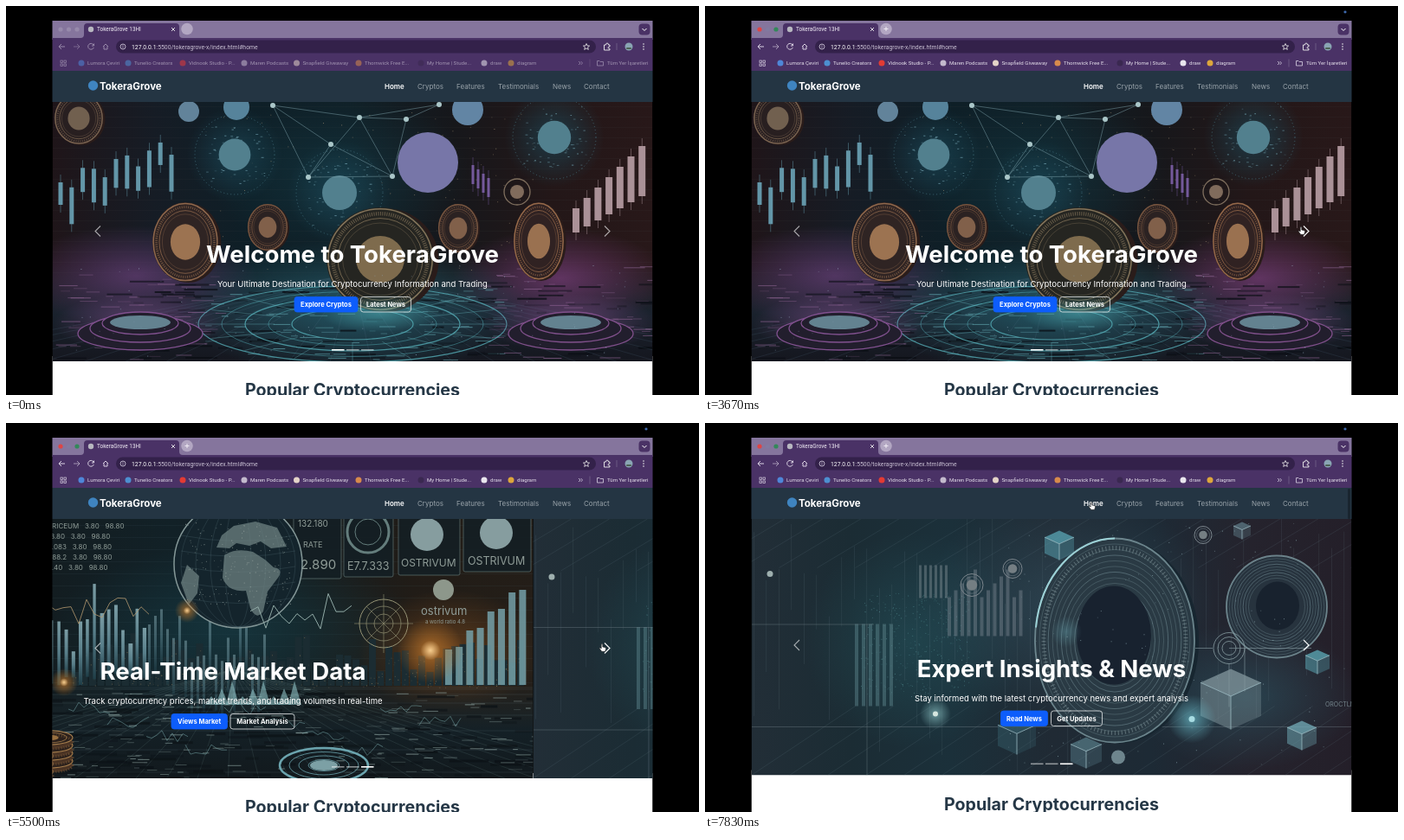
An HTML page that plays this animation: 800 px wide and 450 px high, repeating every 8000 ms.

```html
<!DOCTYPE html>
<html lang="en">
<head>
<meta charset="utf-8">
<title>TokeraGrove</title>
<style>
  html, body { margin: 0; width: 100%; height: 100%; overflow: hidden; background: #000; }
  svg { display: block; width: 100vw; height: 100vh; }
  text { font-family: Inter, "Open Sans", sans-serif; white-space: pre; }
  .ui text { font-family: Roboto, Inter, sans-serif; }
</style>
</head>
<body>
<svg id="stage" viewBox="0 0 800 450"></svg>
<script>
const LEFT = 53.5, WIDTH = 693, LOOP = 8000, TICK = 1000 / 6;

let seed = 7;
const rand = (a = 0, b = 1) => {
  seed = (seed * 16807) % 2147483647;
  return a + (b - a) * seed / 2147483647;
};
const repeat = (n, fn) => Array.from({ length: n }, (_, i) => fn(i)).join('');

// ---- Shape helpers -------------------------------------------------------
let defs = '';
const rect = (x, y, w, h, fill, more = '') =>
  `<rect x="${x}" y="${y}" width="${w}" height="${h}" fill="${fill}" ${more}/>`;
const oval = (x, y, rx, ry, fill, more = '') =>
  `<ellipse cx="${x}" cy="${y}" rx="${rx}" ry="${ry}" fill="${fill}" ${more}/>`;
const dot = (x, y, r, fill, more) => oval(x, y, r, r, fill, more);
const ring = (x, y, rx, ry, color, w = 1, more = '') =>
  oval(x, y, rx, ry, 'none', `stroke="${color}" stroke-width="${w}" ${more}`);
const line = (d, color, w = 1, more = '') =>
  `<path d="${d}" fill="none" stroke="${color}" stroke-width="${w}" ${more}/>`;
const shape = (d, fill, more = '') => `<path d="${d}" fill="${fill}" ${more}/>`;
const text = (x, y, s, size, fill = '#fff', more = '') =>
  `<text x="${x}" y="${y}" font-size="${size}" fill="${fill}" ${more}>${s}</text>`;
const group = (id, kids, more = '') => `<g id="${id}" ${more}>${kids}</g>`;
const BOLD = 'font-weight="700"', MID = 'text-anchor="middle"';

function glow(x, y, rx, ry, color, opacity) {
  const id = 'glow' + color.slice(1);
  if (!defs.includes(`"${id}"`)) {
    defs += `<radialGradient id="${id}"><stop stop-color="${color}"/>
      <stop offset="1" stop-color="${color}" stop-opacity="0"/></radialGradient>`;
  }
  return oval(x, y, rx, ry, `url(#${id})`, `opacity="${opacity}"`);
}
function gradient(id, colors, vertical) {
  const stops = colors.map((c, i) => `<stop offset="${i / (colors.length - 1)}" stop-color="${c}"/>`);
  defs += `<linearGradient id="${id}" ${vertical ? 'x2="0" y2="1"' : ''}>${stops.join('')}</linearGradient>`;
  return `url(#${id})`;
}
// Seeded flecks of a given size range inside a box.
const flecks = (n, x, y, w, h, color, wide = 1, tall = 1) => repeat(n, () =>
  rect(rand(x, x + w).toFixed(1), rand(y, y + h).toFixed(1), rand(wide / 4 + .75, wide).toFixed(1), tall, color,
    `opacity="${rand(.2, .75).toFixed(2)}"`));

function coin(x, y, rx, ry, rim, face, mark) {
  const at = (k, color, w, more) => ring(x, y, rx * k, ry * k, color, w, more);
  return oval(x + rx * .09, y + 1, rx, ry, '#2a1c1a') + oval(x, y, rx, ry, face) +
    at(.97, rim, 1.5) + at(.88, rim, rx * .07, 'stroke-dasharray="1 1.5" opacity=".7"') +
    at(.79, rim, .8) + at(.7, rim, .6, 'opacity=".6"') + oval(x, y, rx * .45, ry * .45, mark);
}
const stack = (x, y, rx, n) => repeat(n, i => {
  const cy = y + (n - 1 - i) * 9;
  return oval(x, cy + 5, rx, rx * .3, '#4b3424') + oval(x, cy, rx, rx * .3, '#2c211c') +
    ring(x, cy, rx, rx * .3, '#a57d4c', 1.2) +
    ring(x, cy + 5, rx, rx * .3, '#7d5b38', 3, 'stroke-dasharray="1 2" opacity=".6"');
}) + ring(x, y, rx * .75, rx * .22, '#a57d4c', .8) + oval(x, y, rx * .4, rx * .12, '#98703f');

const cube = (x, y, r, color) =>
  shape(`M${x} ${y - r}l${r} ${r * .45} ${-r} ${r * .45} ${-r} ${-r * .45}z`, color, 'opacity=".75"') +
  shape(`M${x - r} ${y - r * .55}l${r} ${r * .45}v${r * 1.1}l${-r} ${-r * .45}z`, color, 'opacity=".5"') +
  shape(`M${x + r} ${y - r * .55}l${-r} ${r * .45}v${r * 1.1}l${r} ${-r * .45}z`, color, 'opacity=".33"') +
  line(`M${x - r} ${y - r * .55}l${r} ${r * .45} ${r} ${-r * .45}M${x} ${y - r * .1}v${r * 1.1}`, '#a8c7cf', .7);

const candles = (x, n, step, w, color, top, height) => repeat(n, i => {
  const cx = x + i * step, y = top(i), h = height(i);
  return rect(cx - .4, y - 9, .8, h + 18, color, 'opacity=".6"') + rect(cx - w / 2, y, w, h, color);
});

// ---- Slide pictures ------------------------------------------------------
function coinsScene() {
  const nodes = [[308, 115], [349, 198], [408, 129], [446, 197], [462, 131], [375, 160], [500, 114]];
  const links = [[0, 1], [1, 2], [2, 3], [0, 2], [2, 4], [4, 3], [1, 5], [5, 3], [0, 5], [4, 6], [2, 6], [1, 3]];
  const ghost = (x, y, r) => glow(x, y, r * 1.2, r * 1.2, '#1b4656', .75) +
    ring(x, y, r, r, '#4b7d8b', 1, 'stroke-dasharray="1 3" opacity=".7"') +
    flecks(70, x - r * .75, y - r * .75, r * 1.5, r * 1.5, '#6f9fad', 3) + dot(x, y, r * .4, '#52808e');
  const pad = (x, y, color) => glow(x, y, 100, 34, color, .6) + repeat(3, i =>
    oval(x, y + 12 - i * 6, 72 - i * 14, 19 - i * 3, '#221e2d', `stroke="${color}" stroke-width="1.3"`)) +
    oval(x, y - 1, 35, 8, '#86b8c5', 'opacity=".65"');
  return rect(LEFT, 111, WIDTH, 300,
      gradient('night', ['#1f1519', '#161c25', '#0e1f27', '#101f26', '#16171b', '#231718', '#281819'])) +
    repeat(17, i => rect(LEFT, 116 + i * 12, WIDTH, .4, '#4d4a50', 'opacity=".25"')) +
    rect(LEFT, 298, WIDTH, 113, gradient('floor', ['#20283100', '#1a222d', '#15171f'], true)) +
    glow(150, 312, 140, 58, '#69407a', .7) + glow(640, 315, 125, 58, '#743c76', .75) +
    glow(400, 350, 200, 80, '#266b7a', .7) + glow(385, 195, 150, 95, '#14424f', .45) +
    flecks(110, 230, 120, 380, 190, '#a08d70') +
    flecks(60, 55, 305, 190, 105, '#8e6592', 26) + flecks(60, 550, 300, 196, 110, '#8e6592', 26) +
    flecks(80, 230, 325, 340, 85, '#5fa3ad', 24) + flecks(110, 55, 310, 690, 100, '#090d13', 40, 2) +
    repeat(24, i => line(`M400 310L${LEFT - 300 + i * 56} 430`, '#59738a', .5, 'opacity=".35"')) +
    ghost(264, 172, 46) + ghost(385, 216, 50) + ghost(633, 152, 48) +
    links.map(([a, b]) => line(`M${nodes[a]}L${nodes[b]}`, '#84aab3', .7, 'opacity=".65"')).join('') +
    nodes.map(([x, y]) => dot(x, y, 3, '#aac6c8')).join('') +
    candles(63, 11, 12.8, 5, '#6396a8', i => 204 - i * 4.2 + 11 * Math.sin(i * 2), i => 26 + 17 * Math.sin(i * 1.4) ** 2) +
    candles(658, 7, 12.7, 8, '#aa9197', i => 234 - i * 12, i => 28 + 5 * i) +
    candles(539, 4, 6, 3, '#74599b', i => 184 + i * 5, () => 22) +
    repeat(5, i => ring(400, 368, 70 + i * 27, 18 + i * 6.5, '#58b5be', i % 2 ? .6 : 1.2, 'opacity=".75"')) +
    repeat(16, i => {
      const a = i * Math.PI / 8, c = Math.cos(a), s = Math.sin(a);
      return line(`M${400 + 90 * c} ${368 + 22 * s}L${400 + 176 * c} ${368 + 43 * s}`, '#68b7bf', .6, 'opacity=".6"');
    }) +
    pad(155, 367, '#81518f') + pad(652, 367, '#80508b') +
    coin(84, 130, 28, 30, '#79624f', '#281f20', '#71604f') +
    coin(302, 256, 23, 27, '#77553f', '#2b2222', '#81604a') +
    coin(522, 257, 23, 28, '#77553f', '#2b2222', '#81604a') +
    coin(207, 273, 38, 46, '#8f684c', '#2f2423', '#9c7351') +
    coin(615, 272, 29, 45, '#966949', '#302222', '#9a7150') +
    ring(590, 215, 15, 15, '#80705f', 1.3) + dot(590, 215, 8, '#806b5c') +
    coin(432, 293, 62, 60, '#84745a', '#252521', '#7e6b4d') +
    glow(432, 355, 70, 22, '#55b8be', .5) +
    dot(487, 181, 35, '#7776a8') + dot(266, 117, 15, '#56839b') +
    dot(533, 120, 18, '#6285a4') + dot(211, 122, 12, '#62839a') +
    flecks(90, 70, 300, 660, 105, '#9ab1c7');
}

function marketScene() {
  const frame = (x, y, w, h) => rect(x, y, w, h, '#141f24', 'stroke="#5f7270" stroke-width=".8" rx="2" opacity=".9"');
  const label = (x, y, s, size) => text(x, y, s, size, '#8f9c97');
  const zigzag = (x, y, n, step, amp) => 'M' + repeat(n, i => `${x + i * step} ${(y + rand(-amp, amp)).toFixed(1)} `);
  const flare = (x, y, r) => glow(x, y, r, r, '#c47a2c', .75) + glow(x, y, r * .3, r * .3, '#ffd89a', .9);
  const bar = gradient('bar', ['#86aab2', '#5f8894', '#20404a'], true);
  return rect(LEFT, 111, WIDTH, 300,
      gradient('room', ['#171b1e', '#131d21', '#122127', '#141d20', '#211c17', '#241e18'])) +
    repeat(14, i => rect(LEFT, 118 + i * 14, WIDTH, .4, '#4b6467', 'opacity=".3"')) +
    glow(400, 240, 210, 100, '#17414b', .6) + glow(650, 265, 105, 72, '#70441d', .75) +
    rect(LEFT, 300, WIDTH, 111, gradient('table', ['#1e2b3000', '#142026', '#12191d'], true)) +
    repeat(55, i => {
      const h = rand(15, 62), x = 215 + i * 9.5;
      return rect(x, 304 - h, 8, h, '#1b2c32') + flecks(5, x, 306 - h, 8, h, '#8c7a58');
    }) +
    repeat(30, i => {
      const h = 32 + 55 * Math.abs(Math.sin(i * .34)) + rand(-12, 42), w = rand(3, 5);
      return rect(58 + i * 8.2, 304 - h - rand(0, 18), w, h, bar, 'opacity=".9"');
    }) +
    repeat(20, i => rect(302 + i * 7, 304 - 25 - rand(0, 65), 3, 65, bar, 'opacity=".5"')) +
    frame(78, 104, 100, 60) + coin(138, 120, 37, 36, '#a17d54', '#2b2824', '#92704c') +
    label(79, 177, 'DALCOIN', 18.5) + label(79, 192, 'OSTRIVUM', 16) +
    repeat(5, i => label(186, 122 + i * 12, ['PRICEUM', '13.80', '2.083', '1.88.2', '9.40'][i] +
      '   3.80   98.80', 8)) +
    frame(470, 104, 55, 76) + label(475, 120, '132.180', 10) + label(481, 144, 'RATE', 9) + label(478, 169, '2.890', 15) +
    frame(528, 107, 57, 71) + ring(556, 126, 24, 24, '#647d7c', 3) + ring(556, 126, 15, 15, '#647d7c', 1) +
    label(532, 170, 'E7.7.333', 12.5) +
    frame(591, 102, 71, 74) + frame(666, 102, 78, 70) +
    dot(624, 129, 19, '#869d9f') + dot(704, 127, 19, '#869d9f') +
    label(594, 166, 'OSTRIVUM', 12) + label(671, 164, 'OSTRIVUM', 12.5) +
    dot(406, 163, 74, '#14242c', 'stroke="#849797" stroke-width="1.5"') +
    repeat(4, i => ring(406, 163, 15 + i * 17, 73, '#58747c', .5, 'opacity=".5"')) +
    repeat(5, i => line(`M340 ${130 + i * 18}Q406 ${143 + i * 18} 472 ${130 + i * 18}`, '#58747c', .5, 'opacity=".5"')) +
    shape('M390 153q13-9 33-4l14 9 10 9q12 2 5 12l-12 16-5 23q-8 11-15-4l-5-20q-21 2-27-15zM381 144l6-14 14-11 25-5 25 7 11 22-18 2-12-8-13 5-15-3-8 6zM347 164l14 13-2 20-10 13-9-25z', '#6d8081', 'opacity=".75"') +
    flecks(170, 345, 115, 122, 95, '#a6b2ac') +
    line(zigzag(60, 220, 28, 9, 18), '#b59a70', .8) + line(zigzag(420, 222, 14, 9, 25), '#91aaa6', 1) +
    ring(574, 232, 28, 28, '#949274', 1) + ring(574, 232, 20, 20, '#949274', .7) + ring(574, 232, 11, 11, '#949274', .7) +
    line('M540 232h68M574 198v68M554 212l40 40M594 212l-40 40', '#949274', .6) +
    dot(643, 193, 12, '#8d978b') + label(617, 222, 'ostrivum', 13) + label(622, 232, 'a world ratio 4.8', 6) +
    repeat(8, i => rect(645 + i * 12.2, 262 - i * 11 + (i % 2) * 8, 8, 41 + i * 11 - (i % 2) * 8, '#75a0a8', 'opacity=".85"')) +
    repeat(28, i => line(`M400 285L${-100 + i * 38} 420`, '#5a7377', .5, 'opacity=".45"')) +
    repeat(8, i => line(`M54 ${306 + i * i * 2}H746`, '#5a7377', .5, 'opacity=".4"')) +
    flecks(150, 55, 306, 690, 104, '#0b1115', 46, 3) + flecks(170, 200, 306, 545, 104, '#8fa5a2', 18) +
    repeat(10, i => line(zigzag(210 + i * 45, 330 + i % 4 * 16, 9, 6, 7), '#7fb1b4', .8, 'opacity=".6"')) +
    repeat(9, i => shape(`M${368 + i * 12} 326l7 ${-10 - i % 3 * 9} 8 ${10 + i % 3 * 9}z`, '#8fc1c5', 'opacity=".6"')) +
    repeat(4, i => ring(505, 396, 51 - i * 11, 20 - i * 4.5, '#6ba4ae', i ? .8 : 2.5)) + oval(505, 396, 16, 6, '#7ca0a5') +
    flare(347, 217, 14) + flare(628, 263, 38) + flare(101, 315, 23) + flare(155, 288, 17) + flare(205, 300, 16) +
    stack(188, 364, 27, 4) + stack(150, 385, 42, 3) + stack(78, 372, 23, 4) + stack(77, 403, 30, 2);
}

function insightScene() {
  const rings = (x, y, rx, ry, n) => repeat(n, i => ring(x, y, rx * (1 - i * .055), ry * (1 - i * .055),
    '#78939b', i ? .6 : 1.8, `opacity="${i % 3 ? .55 : .85}"`));
  const mini = (x, y, r) => ring(x, y, r, r, '#7b858c', 1) + ring(x, y, r * .75, r * .75, '#6c7a82', .6) + dot(x, y, r * .48, '#747e83');
  return rect(LEFT, 111, WIDTH, 300,
      gradient('steel', ['#222e37', '#1b2c34', '#1b303a', '#202a34', '#1d2a35', '#25232d', '#241f29'])) +
    glow(240, 255, 125, 125, '#24515a', .6) + glow(420, 215, 170, 130, '#375766', .55) +
    glow(625, 320, 130, 85, '#2b5260', .65) +
    repeat(48, i => rect(56 + i * 14.5, rand(105, 230), .6, rand(60, 220), '#6d848b', 'opacity=".25"')) +
    repeat(22, i => {
      const x = LEFT + i * 44;
      return line(`M${x} 111l-100 60M${x} 411l120 -80`, '#637c85', .5, 'opacity=".35"');
    }) +
    flecks(380, 180, 200, 125, 120, '#4f868c') +
    repeat(6, i => rect(173 + i * 8, 236, 4, 95, '#547a82', 'opacity=".55"')) +
    repeat(12, i => rect(280 + i * 7.5, 205 - i % 5 * 8, 4, 45 + i % 5 * 8, '#869099', 'opacity=".4"')) +
    repeat(6, i => rect(247 + i * 6, 168, 3, 38, '#8c989d', 'opacity=".4"')) +
    line('M54 236.5H195M187 236V411M54 355H746', '#78888f', .6, 'opacity=".6"') +
    dot(75, 178, 3.5, '#9eafae') + mini(308, 191, 13) + mini(355, 172, 11) + mini(575, 133, 10) +
    cube(409, 145, 17, '#5aa6b5') + cube(620, 128, 10, '#5c7884') +
    oval(478, 256, 92, 118, '#172630') + oval(473, 255, 92, 118, '#2a3a44') + rings(473, 255, 92, 118, 11) +
    ring(473, 255, 82, 107, '#90a4a8', 5, 'stroke-dasharray="1 3" opacity=".5"') +
    oval(472, 249, 43, 57, '#18222f') +
    line('M382 240A92 118 0 0 1 473 137', '#9bd0d5', 2) +
    dot(660, 216, 58, '#27333e') + rings(660, 216, 58, 59, 9) + oval(661, 215, 25, 28, '#18222e') +
    repeat(3, i => ring(605, 264, 18 - i * 5, 18 - i * 5, '#899da3', .8)) +
    line('M605 264H700M623 264v50M586 264h-20M605 282v50', '#899da3', .6) +
    cube(607, 323, 35, '#83979e') + cube(689, 365, 17, '#73adb9') + cube(707, 280, 14, '#5dabb9') +
    cube(440, 385, 18, '#557985') + cube(360, 365, 22, '#345c68') +
    dot(477, 390, 8, '#6e858d') +
    glow(562, 346, 28, 28, '#69b9c7', .7) + glow(266, 340, 18, 18, '#88bec0', .7) + glow(417, 245, 18, 18, '#66a4b0', .4) +
    dot(266, 340, 3, '#d6e6df') + dot(562, 346, 3.5, '#a7dce2') +
    text(716, 331, 'OROCTLN', 7, '#75858c') + flecks(150, 350, 115, 390, 285, '#91adb5');
}

// ---- Carousel ------------------------------------------------------------
const button = (x, w, s, fill, edge) =>
  rect(x, 336.5, w, 17.5, fill, `rx="3" stroke="${edge}" stroke-width=".8"`) +
  text(x + w / 2, 348, s, 7.5, '#fff', `${BOLD} ${MID}`);
const slide = (i, scene, title, note, first, second) => group('slide' + i, scene() +
  text(400, 297, title, 27.6, '#fff', `${BOLD} ${MID}`) + text(400, 325, note, 9.5, '#fff', MID) +
  button(...first, '#0d5dfb', '#0d5dfb') + button(...second, 'none', '#e5e8e9'), 'clip-path="url(#hero)"');
const carousel =
  slide(0, coinsScene, 'Welcome to TokeraGrove',
    'Your Ultimate Destination for Cryptocurrency Information and Trading',
    [333, 73, 'Explore Cryptos'], [409.5, 58, 'Latest News']) +
  slide(1, marketScene, 'Real-Time Market Data',
    'Track cryptocurrency prices, market trends, and trading volumes in real-time',
    [329, 64.5, 'Views Market'], [397, 74, 'Market Analysis']) +
  slide(2, insightScene, 'Expert Insights &amp; News',
    'Stay informed with the latest cryptocurrency news and expert analysis',
    [341.5, 54, 'Read News'], [399.5, 59, 'Get Updates']);

const page = group('page', rect(LEFT, 405, WIDTH, 60, '#fff') + carousel +
  line('M109 254.5l-6 6 6 6', '#fff', 1.1, 'opacity=".6"') +
  line('M691 254.5l6 6-6 6', '#fff', 1.2, 'id="next"') +
  repeat(3, i => rect(376 + i * 17, 397, 14.5, 1.6, '#fff', `id="bar${i}"`)) +
  text(400, 451, 'Popular Cryptocurrencies', 19.7, '#253746', `${BOLD} ${MID}`));

// ---- Browser window ------------------------------------------------------
const links = [[475, 'Cryptos'], [520, 'Features'], [568, 'Testimonials'], [631, 'News'], [667, 'Contact']];
const navbar = rect(LEFT, 75, WIDTH, 36, '#243543') + dot(100.5, 92, 5.7, '#3f84c0') +
  text(108, 96.5, 'TokeraGrove', 11.5, '#fff', BOLD) +
  text(437, 95.5, 'Home', 8, '#fff', 'font-weight="600"') +
  links.map(([x, s]) => text(x, 95.5, s, 8, '#98a2a9')).join('');

const marks = [
  [87, '#4f86d8', 'Lumora Çeviri'], [141, '#4d8fd0', 'Tunelio Creators'], [204, '#e33b34', 'Vidnook Studio - P...'],
  [275, '#c3bacd', 'Maren Podcasts'], [335.5, '#e4d3c8', 'Snapfield Giveaway'], [407, '#d78a4c', 'Thornwick Free E...'],
  [479, '#3a2850', 'My Home | Stude...'], [552, '#e9e6ee', 'draw'], [583, '#dda63c', 'diagram']];
const PALE = '#d9d1e2';
const dimmable = group('dimmable',
  line('M68 47h-7m3-3l-3 3 3 3', PALE) + line('M78 47h7m-3-3l3 3-3 3', PALE, 1, 'opacity=".6"') +
  line('M101 45a3.4 3.4 0 1 0 .3 3M101.5 43.5v2.5h-2.5', PALE) + line('M112 47l3-3 3 3M113 46.5v3.5h4v-3.5', PALE) +
  repeat(4, i => rect(63 + i % 2 * 4, 63 + (i >> 1) * 4, 2.5, 2.5, 'none', `stroke="${PALE}" stroke-width=".7"`)) +
  marks.map(([x, c, s]) => dot(x, 66, 3.5, c) + text(x + 7, 68.2, s, 6.1, '#e6e0ec')).join('') +
  line('M661 64l2 2-2 2m2.5-4l2 2-2 2', PALE, .8) + line('M674 61.5v9', '#75638c', .8) +
  line('M682.5 63.5h2.5l1 1h3.5v4.5h-7z', PALE, .8) + text(694, 68.2, 'Tüm Yer İşaretleri', 6.1, '#e6e0ec'));

const browser = group('browser',
  rect(LEFT, 17, WIDTH, 22, '#85759d') + rect(LEFT, 37, WIDTH, 38, '#4a3266') +
  shape('M86 37q4 0 4-4v-9q0-4 4-4h102q4 0 4 4v9q0 4 4 4z', '#4a3266') +
  repeat(3, i => dot(63 + i * 9.5, 27, 2.6, '#978aab', `id="light${i}"`)) +
  dot(98, 27, 3.2, '#b7b7c0') + text(105, 29.3, 'TokeraGrove 13HI', 6.4, '#f3eff7') +
  line('M191 25l4 4m0-4l-4 4', '#eee', .9) + dot(209, 26.5, 6.8, '#b2a6c2') +
  line('M206.5 26.5h5m-2.5-2.5v5', '#f4f0f8', .9, 'id="plus"') +
  rect(730.5, 20.5, 13, 13, '#4a3266', 'rx="4"') + line('M734.5 26l2.5 2.5 2.5-2.5', '#fff') +
  rect(127, 39.5, 554, 15, '#33214a', 'rx="7.5"') +
  ring(135, 47, 3, 3, PALE, .8) + line('M135 46.5v2M135 45v.8', PALE, .8) +
  text(145, 49.5, '<tspan fill="#fff">127.0.0.1</tspan>:5500/tokeragrove-x/index.html#home', 6.85, '#c9c0d3') +
  line('M670 43.5l1 2.4 2.6.2-2 1.7.7 2.6-2.3-1.4-2.3 1.4.7-2.6-2-1.7 2.6-.2z', '#eee', .8) +
  line('M690.5 45h2q0-2 1.5-2t1.5 2h1.5v2q-2 0-2 1.2t2 1.3v1.5h-6.5z', '#eee', .9) +
  line('M705 43v8', '#75638c', .8) + dot(719, 47, 4.5, '#8aa5b4') + rect(716, 48, 6, 2, '#4c6255', 'rx="1"') +
  repeat(3, i => dot(736, 44 + i * 3, .8, '#eee')) + dimmable, 'class="ui"');

const arrow = shape('M0 0v7.5l1.7-1.6 1.3 2.8 1.3-.6-1.3-2.7h2.4z', '#111', 'id="arrow" stroke="#fff" stroke-width=".7"');
const hand = shape('M-.8 0q.8-1 1.6 0v3l3 .8q.9.4.7 1.5l-.8 3h-4l-2.6-3.5q.2-1.2 1.2-.6l.9.8z', '#fff',
  'id="hand" stroke="#222" stroke-width=".6"');

const clip = (id, h) => `<clipPath id="${id}">${rect(LEFT, 111, WIDTH, h, '#000')}</clipPath>`;
const stage = document.getElementById('stage');
stage.innerHTML = `<defs>${clip('view', 339)}${clip('hero', 300)}${defs}</defs>` +
  rect(0, 0, 800, 450, '#000') + dot(739, 7, 2.2, '#3d69ad', 'id="lamp"') +
  `<g clip-path="url(#view)">${page}</g>` + navbar +
  rect(742, 76, 3, 35, '#0d151b', 'id="thumb" rx="1.5" opacity=".5"') + browser + group('cursor', arrow + hand);

// ---- Motion --------------------------------------------------------------
const set = (id, name, value) => document.getElementById(id).setAttribute(name, value);
const show = (id, on) => set(id, 'visibility', on ? 'visible' : 'hidden');
const clamp = v => Math.min(1, Math.max(0, v));
const smooth = v => v * v * (3 - 2 * v);

// cubic-bezier(.42, 0, .58, 1)
function easeInOut(v) {
  let lo = 0, hi = 1;
  for (let i = 0; i < 24; i++) {
    const s = (lo + hi) / 2, r = 1 - s;
    if (1.26 * s * r * r + 1.74 * s * s * r + s ** 3 < v) lo = s; else hi = s;
  }
  return smooth(hi);
}
const turn = (t, start) => easeInOut(clamp((t - start) / 600));

const route = [[800, 470, 448], [1667, 521, 214], [2000, 521, 214], [2167, 523, 210], [3600, 688, 256],
  [6167, 688, 256], [6500, 410, 238], [7000, 410, 238], [7833, 446, 92], [LOOP, 446, 92]];
function pointer(t) {
  const i = Math.max(1, route.findIndex(([at]) => at > t));
  const [t0, x0, y0] = route[i - 1], [t1, x1, y1] = route[i];
  const k = smooth(clamp((t - t0) / (t1 - t0)));
  return [x0 + (x1 - x0) * k, y0 + (y1 - y0) * k];
}

function draw(now) {
  // Six pictures a second; the margin absorbs steps rounded to 10 ms.
  const t = Math.floor((now + 8) % LOOP / TICK) * TICK + .5;
  const place = turn(t, 3900) + turn(t, 5315);
  const active = (t > 3900) + (t > 5315);
  const focused = t > 3660, scroll = t > 7800 ? 3.5 : 0;
  const [x, y] = pointer(t);
  const onLink = Math.abs(x - 688) < 8 || (y < 100 && t > 7500);

  for (let i = 0; i < 3; i++) {
    const shift = (i - place) * WIDTH;
    set('slide' + i, 'transform', `translate(${shift} 0)`);
    show('slide' + i, Math.abs(shift) < WIDTH);
    set('bar' + i, 'opacity', i === active ? 1 : .5);
    set('light' + i, 'fill', focused ? ['#dd4545', '#817aa0', '#33885a'][i] : '#978aab');
  }
  set('page', 'transform', `translate(0 ${-scroll})`);
  set('next', 'opacity', t > 3400 ? .95 : .6);
  set('dimmable', 'opacity', focused ? 1 : .55);
  show('plus', focused);
  show('thumb', scroll > 0);
  show('lamp', t > 330);
  set('lamp', 'rx', t < 2300 ? 2.2 : 1.6);
  set('lamp', 'ry', t < 2300 ? 2.2 : 1.4);
  show('arrow', t > 820 && !onLink);
  show('hand', t > 820 && onLink);
  set('cursor', 'transform', `translate(${x} ${y})`);
}

const began = performance.now();
(function loop() {
  draw(performance.now() - began);
  requestAnimationFrame(loop);
})();
</script>
</body>
</html>
```
